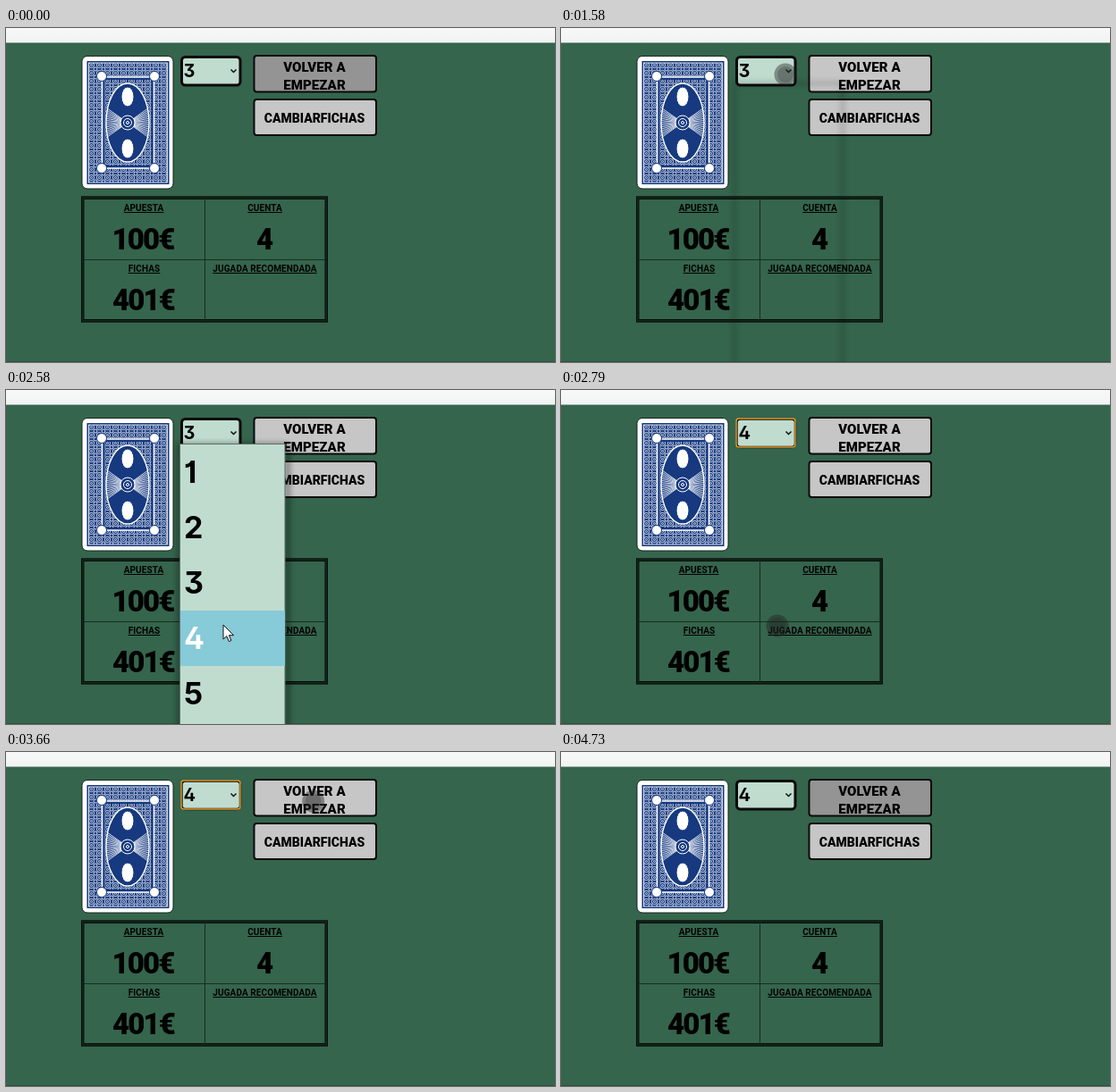
Write an HTML page that moves like this. It is 614 by 374 pixels and loops after 5590 ms.

```html
<!DOCTYPE html>
<html lang="es">
<head>
<meta charset="utf-8">
<title>Mesa de cartas</title>
<style>
  html, body { margin: 0; width: 100%; height: 100%; overflow: hidden; background: #35654d; }
  svg { display: block; width: 100%; height: 100%; }
  text { font-family: Roboto, "Liberation Sans", sans-serif; font-weight: 900; text-anchor: middle; }
  .label { font-size: 10px; font-weight: 700; letter-spacing: .1px; text-decoration: underline; }
  .amount { font-size: 33px; letter-spacing: -1.9px; }
  .volver { font-size: 15px; letter-spacing: .1px; }
  .cambiar { font-size: 14px; }
  .digit { font-family: Inter, "DejaVu Sans", sans-serif; font-weight: 700; text-anchor: start;
           font-feature-settings: "cv01", "cv02", "cv09"; }
  .option { font-size: 34px; }
  .value { font-size: 20px; }
</style>
</head>
<body>
<svg viewBox="0 0 614 374" preserveAspectRatio="none">
  <defs>
    <linearGradient id="bar" x2="0" y2="1">
      <stop offset="0" stop-color="#f8f8f8"/><stop offset="1" stop-color="#f1f3f3"/>
    </linearGradient>
    <pattern id="lace" x="91" y="37" width="9" height="9" patternUnits="userSpaceOnUse">
      <g fill="none" stroke="#fff" stroke-width=".8">
        <circle cx="4.5" cy="4.5" r="3.1"/><circle cx="4.5" cy="4.5" r="1"/>
        <path d="M0 2Q2 2 2 0M9 2Q7 2 7 0M0 7Q2 7 2 9M9 7Q7 7 7 9"/>
      </g>
    </pattern>
    <clipPath id="panel"><ellipse cx="136" cy="106" rx="24" ry="44"/></clipPath>
    <filter id="soft" x="-20%" y="-10%" width="140%" height="120%"><feGaussianBlur stdDeviation="3"/></filter>
  </defs>

  <rect width="614" height="374" fill="#35654d"/>
  <rect width="614" height="16.5" fill="url(#bar)"/>
  <rect y="373" width="614" height="1" fill="#2c5440"/>

  <g id="card">
    <rect x="85" y="31.5" width="102" height="148.5" rx="6" fill="#fff" stroke="#14251c"/>
    <rect x="90.5" y="37" width="92" height="138" fill="#16397f"/>
    <rect x="92.5" y="39" width="88" height="134" fill="url(#lace)" stroke="#fff" stroke-width=".8"/>
    <rect x="107.5" y="55" width="58" height="102" rx="3" fill="#16397f" stroke="#fff" stroke-width="1.6"/>
    <rect x="110.5" y="58" width="52" height="96" fill="url(#lace)"/>
    <ellipse cx="136" cy="106" rx="24" ry="44" fill="#16397f" stroke="#fff" stroke-width="1.3"/>
    <g clip-path="url(#panel)" id="rays" stroke="#fff" stroke-width=".8"></g>
    <g fill="#16397f" stroke="#fff">
      <circle cx="136" cy="106" r="8"/><circle cx="136" cy="106" r="4.5"/><circle cx="136" cy="106" r="1.5"/>
    </g>
    <g fill="#fff" stroke="#16397f">
      <ellipse cx="136" cy="77" rx="7" ry="11"/><ellipse cx="136" cy="135" rx="7" ry="11"/>
      <circle cx="107" cy="54" r="5.5"/><circle cx="166" cy="54" r="5.5"/>
      <circle cx="107" cy="157" r="5.5"/><circle cx="166" cy="157" r="5.5"/>
    </g>
  </g>

  <g fill="none" stroke="#080d0a">
    <rect x="85.5" y="190" width="273" height="138" stroke-width="3" stroke="#15281e"/>
    <rect x="84.5" y="189" width="275" height="140"/>
    <rect x="87" y="191.5" width="270" height="135"/>
    <path d="M222.5 191V327M87 259.5H357" stroke="#172c22"/>
  </g>
  <g id="cells"></g>

  <g stroke="#0a0a0a" stroke-width="2">
    <rect id="volver" x="277.5" y="31" width="136.5" height="40.5" rx="3"/>
    <rect x="277.5" y="80" width="136.5" height="40" rx="3" fill="#c6c6c6"/>
  </g>
  <text class="volver" x="345" y="49">VOLVER A</text>
  <text class="volver" x="345" y="69">EMPEZAR</text>
  <text class="cambiar" x="345" y="105.5">CAMBIARFICHAS</text>

  <rect x="196.5" y="32.5" width="65.5" height="31.5" rx="4" fill="#c0dccf"/>
  <rect id="selectEdge" x="196.5" y="32.5" width="65.5" height="31.5" rx="4" fill="none"/>
  <rect id="selectFocus" x="196" y="32" width="66" height="32" rx="3" fill="none" stroke="#e59a2c" stroke-width="1.5"/>
  <text id="value" class="digit value" x="198.5" y="55"></text>
  <path d="M251.5 46.5l3 3 3-3" fill="none" stroke="#111" stroke-width="1.5"/>

  <rect id="menuShadow" x="194" y="62" width="121" height="330" fill="none" stroke="#000" stroke-width="4" filter="url(#soft)"/>
  <g id="menu">
    <rect x="194.5" y="60.5" width="117.5" height="330" fill="#c0dccf" stroke="#5d6f66"/>
    <rect id="marked" x="195" width="117" height="62" fill="#87cad8"/>
    <g id="options"></g>
  </g>

  <g id="spot">
    <circle r="12.5" fill="#222" opacity=".42"/><circle r="9" fill="#222" opacity=".22"/>
  </g>
  <path id="arrow" d="M0 0V16L3.8 12.6 6.3 18.6 8.9 17.5 6.4 11.7H11.6Z" fill="#fff" stroke="#111" stroke-linejoin="round"/>
</svg>

<script>
const LOOP = 5590;
const $ = id => document.getElementById(id);

function add(parent, name, attrs, text = "") {
  const el = document.createElementNS("http://www.w3.org/2000/svg", name);
  for (const key in attrs) el.setAttribute(key, attrs[key]);
  el.textContent = text;
  parent.append(el);
  return el;
}

// static parts built from short rules
for (let i = -7; i <= 7; i++) {
  for (const side of [-1, 1])
    add($("rays"), "line", { x1: 136, y1: 106, x2: 136 + side * 26, y2: 106 + i * 2.6 });
}
const cells = [
  ["APUESTA", 154, 205, "100€"], ["CUENTA", 289.5, 205, "4"],
  ["FICHAS", 154.5, 273, "401€"], ["JUGADA RECOMENDADA", 289.5, 273, ""]
];
for (const [label, x, y, amount] of cells) {
  add($("cells"), "text", { class: "label", x, y }, label);
  if (amount) add($("cells"), "text", { class: "amount", x: x - 1, y: y + 43 }, amount);
}
const rowTop = n => 61 + 62 * (n - 1);
const options = [1, 2, 3, 4, 5].map(n =>
  add($("options"), "text", { class: "digit option", x: 199, y: rowTop(n) + 43 }, n));

// pointer moves: start, end, step count, waypoints as [step, x, y]
const moves = [
  [460, 660, 3, [[0, 458, 339], [2, 321, 186], [3, 330, 146]]],
  [920, 1050, 2, [[0, 304, 104], [2, 248, 24]]],
  [1250, 1780, 8, [[0, 248, 27], [4, 251, 50], [5, 251, 52], [8, 251, 55]]],
  [1850, 2390, 8, [[0, 251, 62], [4, 248, 179], [8, 253, 224]]],
  [2450, 2920, 7, [[0, 252, 248], [2, 243, 263], [3, 242, 264], [6, 242, 264], [7, 267, 230]]],
  [3010, 3520, 8, [[0, 268, 226], [2, 285, 190], [5, 328, 98], [7, 341, 64], [8, 343, 55]]],
  [3590, 4130, 8, [[0, 343, 55], [3, 345, 56], [5, 376, 85], [6, 406, 115], [8, 506, 232]]],
  [4200, 4730, 8, [[0, 526, 268], [2, 552, 330], [4, 562, 356], [8, 563, 359]]]
];

function pointerAt(t) {
  const move = moves.filter(m => t >= m[0]).pop();
  if (!move || t >= 4730) return null;
  const [start, end, count, points] = move;
  const step = Math.min(count, Math.floor((t - start) / (end - start) * count + 0.1));
  const next = Math.max(1, points.findIndex(p => p[0] >= step));
  const [k0, x0, y0] = points[next - 1], [k1, x1, y1] = points[next];
  const f = (step - k0) / (k1 - k0);
  return [x0 + (x1 - x0) * f, y0 + (y1 - y0) * f];
}

function show(el, opacity) {
  el.setAttribute("opacity", Number(opacity));
}

function draw(t) {
  const chosen = t >= 2645;
  const selectFocused = chosen && t < 3720;
  const buttonFocused = t < 1445 || t >= 3720;
  const menuOpacity = t < 1645 || chosen ? 0 : t < 1710 ? 0.6 : 1;
  const marked = t < 2450 ? 3 : 4;

  $("volver").setAttribute("fill", buttonFocused ? "#949494" : "#c6c6c6");
  $("value").textContent = chosen ? 4 : 3;
  $("selectEdge").setAttribute("stroke", "#0a0a0a");
  $("selectEdge").setAttribute("stroke-width", selectFocused ? 2.4 : 3);
  show($("selectFocus"), selectFocused);

  show($("menu"), menuOpacity);
  show($("menuShadow"), menuOpacity ? menuOpacity * 0.5 : t >= 1575 && !chosen ? 0.2 : 0);
  $("marked").setAttribute("y", rowTop(marked));
  options.forEach((el, i) => el.setAttribute("fill", i + 1 === marked ? "#fff" : "#000"));

  const pointer = pointerAt(t);
  const overMenu = t >= 1850 && !chosen;
  show($("spot"), pointer && !overMenu);
  show($("arrow"), pointer && overMenu);
  if (pointer) (overMenu ? $("arrow") : $("spot")).setAttribute("transform", `translate(${pointer})`);
}

const begin = performance.now();
function tick() {
  draw((performance.now() - begin) % LOOP);
  requestAnimationFrame(tick);
}
tick();
</script>
</body>
</html>
```
